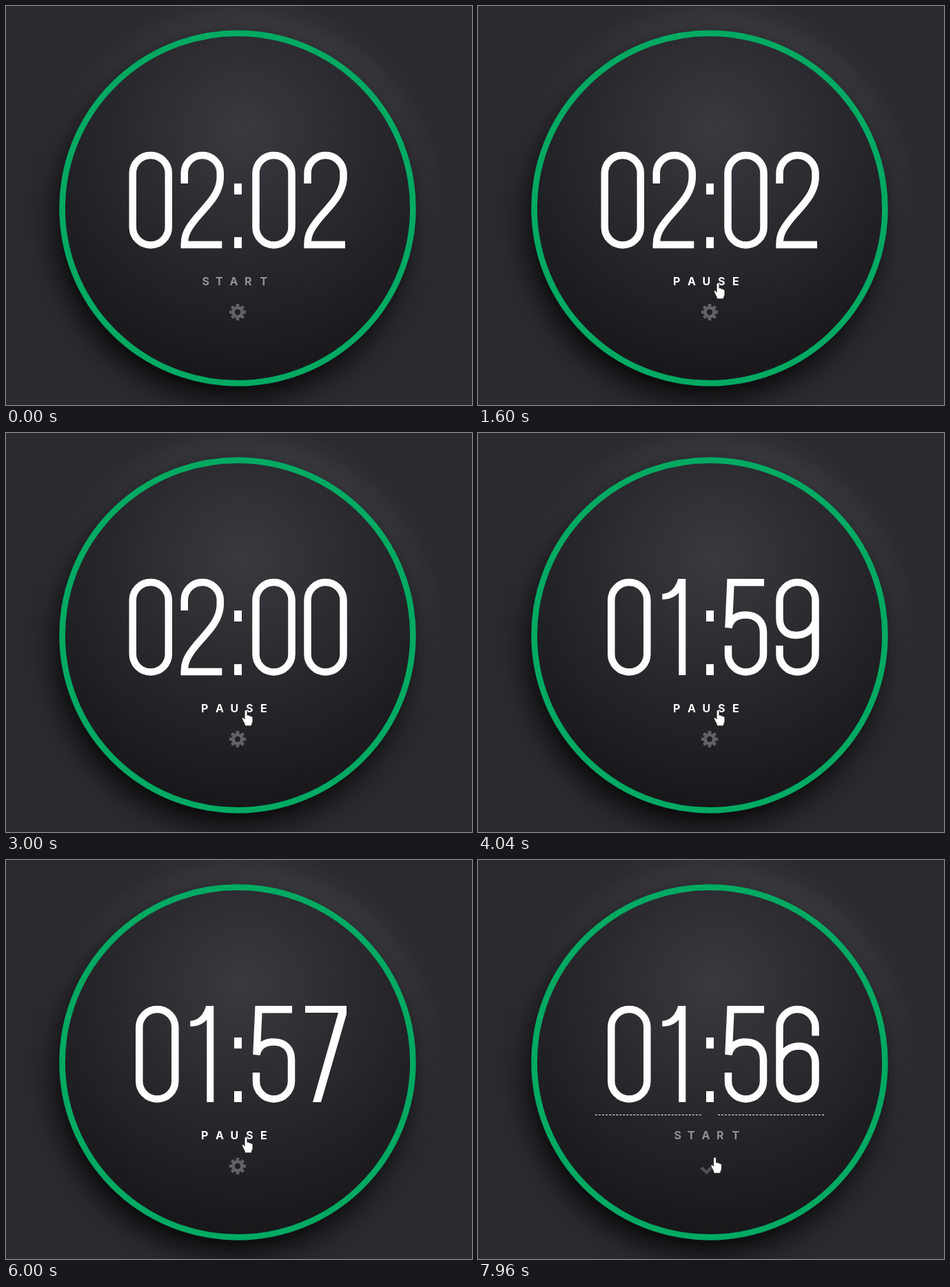
An HTML page that plays this animation: 676x580 px, repeating every 8 s.

```html
<!DOCTYPE html>
<html lang="en">
<head>
<meta charset="utf-8">
<title>Countdown timer</title>
<style>
  html, body { margin: 0; width: 100%; height: 100%; overflow: hidden; background: #2b2a30; }
  #face {
    position: absolute; left: 77px; top: 35px; width: 518px; height: 518px; border-radius: 50%;
    background: radial-gradient(71.4% 71.4% at 51.7% 28.4%, #3a393f 0%, #17171a 100%);
    box-shadow: -5px 14px 44px #000, 5px -16px 50px rgba(255, 255, 255, .15);
  }
  .rule { position: absolute; top: 370px; width: 154px; border-top: 1px dashed #fff; }
  svg { position: absolute; left: 0; top: 0; }
  text { font: 700 16px Inter, "Open Sans", sans-serif; fill: #fff; }
  .line { fill: none; stroke: #fff; stroke-width: 10.5; }
  .solid { fill: #fff; }
  .cursor { fill: #fff; stroke: #111; stroke-width: .8; }
</style>
</head>
<body>
<div id="face"></div>
<div id="rules">
  <div class="rule" style="left:170px"></div>
  <div class="rule" style="left:348px"></div>
</div>
<svg width="676" height="580" viewBox="0 0 676 580">
  <defs>
    <rect id="d0" class="line" x="5.5" y="5" width="52" height="130.5" rx="26"/>
    <path id="d1" class="solid" d="M23 0H34V140H24V20C19 26 11 30 0 30V22C12 21 19 13 23 0Z"/>
    <path id="d2" class="line" d="M5.5 46V31A26 26 0 0 1 57.5 31V37C57.5 62 36 80 23 96S5.5 120 5.5 135H60"/>
    <path id="d5" class="line" d="M58 5.2H9.5L6.5 71C9 58 19 52.5 31 52.5C47 52.5 57 62 57 78V109.5A25.5 26 0 0 1 6 109.5V97"/>
    <path id="d9" class="line" d="M57.5 62V31A26 26 0 0 0 5.5 31V57C5.5 73 15 82 29 82C43 82 53 74 57.5 62V109.5A26 26 0 0 1 5.5 109.5V97"/>
    <use id="d6" href="#d9" transform="rotate(180 31.5 70.2)"/>
    <path id="d7" class="solid" d="M2 0H62V12L25 140H13L50 10H2Z"/>
    <g id="d8">
      <rect class="line" x="7" y="5" width="49" height="60" rx="24.5"/>
      <rect class="line" x="5.5" y="65" width="52" height="70.5" rx="26"/>
    </g>
  </defs>

  <circle cx="336" cy="294" r="254.4" fill="none" stroke="#00aa62" stroke-width="8.6"/>
  <g id="digits"></g>
  <path class="solid" d="M331 258h11v16h-11zM331 336h11v16h-11z"/>
  <text id="label" y="406"></text>
  <g id="gear" transform="translate(336 445)" fill="none" stroke="#626164">
    <circle r="6.5" stroke-width="4.6"/>
  </g>
  <path id="tick" d="M324 447L331.5 454.2L346 439.7" fill="none" stroke="#505053" stroke-width="4.5"/>

  <g id="ring" fill="none">
    <circle r="10.8" stroke="#000"/>
    <circle r="9.8" stroke="#fff"/>
  </g>
  <path id="arrow" class="cursor" d="M0 0V16L3.7 12.5 6.4 18.5 8.8 17.4 6.2 11.6H11.5Z"/>
  <path id="hand" class="cursor" d="M-1.9 1.5C-1.9-1 2-1 2 1.5V7.3C3-.1+6.9 4.8 7 5 8.4C5.7 7.6 7.3 7.9 7.6 9.2C8.7 8.7 10 9.5 10 11V15.5C10 18.5 8.2 20 8 22.8H-1.2C-1.5 19-4.2 16.5-5.4 12.6C-6 10.6-4 9.8-2.8 11.4L-1.9 12.8Z"/>
</svg>
<script>
const LOOP = 8000;
const $ = id => document.getElementById(id);

// Each row: start time, then the values held from there on.
const clock = [[0, "0202"], [2000, "0201"], [3000, "0200"], [4040, "0159"],
               [5000, "0158"], [6000, "0157"], [7000, "0156"]];
const labels = [[0, "START", .5], [840, "START", .75], [920, "START", 1], [1600, "PAUSE", 1],
                [7400, "START", 1], [7560, "START", .7], [7640, "START", .5]];
const pointer = [
  [0, ""],
  [200, "arrow", 585, 555], [280, "arrow", 578, 545], [360, "arrow", 567, 529],
  [440, "arrow", 556, 514], [520, "arrow", 547, 504], [600, "arrow", 543, 499],
  [760, "arrow", 478, 462], [840, "hand", 374, 414], [920, "hand", 350, 404.5],
  [1000, "hand", 349, 404], [1080, "hand", 348, 403],
  [7480, "hand", 347, 411], [7560, "hand", 345, 424], [7640, "hand", 343.5, 432.5]
];
const clicks = [[0, false], [1440, true, 347, 402], [1600, false], [7320, true, 347, 402],
                [7400, false], [7880, true, 343, 432], [7960, false]];
const editAt = 7960;
const letterX = { START: "284.5 304 324.5 346 368.5", PAUSE: "283 304 325.5 348 369" };

const at = (rows, t) => rows.findLast(row => row[0] <= t).slice(1);
const place = (el, x, y) => el.setAttribute("transform", `translate(${x} ${y})`);
const show = (el, on) => { el.style.display = on ? "" : "none"; };

for (let i = 0; i < 8; i++) {
  $("gear").insertAdjacentHTML("beforeend",
    `<path d="M0-8V-12" stroke-width="4.6" transform="rotate(${i * 45})"/>`);
}
$("hand").setAttribute("d",
  "M-1.9 1.5C-1.9-1 2-1 2 1.5V7.3C3 6.6 4.7 7 5 8.4C5.8 7.6 7.3 7.9 7.6 9.2" +
  "C8.7 8.7 10 9.5 10 11V15.5C10 18.5 8.2 20 8 22.8H-1.2" +
  "C-1.5 19-4.2 16.5-5.4 12.6C-6 10.6-4 9.8-2.8 11.4L-1.9 12.8Z");

// A pair with a narrow 1 is shifted to stay centred.
function pair(text, x) {
  const narrow = text[1] === "1";
  const first = x + (narrow ? 9.5 : 0);
  const second = x + (narrow ? 89 : 75);
  return `<use href="#d${text[0]}" x="${first}" y="212"/><use href="#d${text[1]}" x="${second}" y="212"/>`;
}

let shown = "";
function draw(t) {
  const [time] = at(clock, t);
  if (time !== shown) {
    $("digits").innerHTML = pair(time.slice(0, 2), 178.3) + pair(time.slice(2), 357);
    shown = time;
  }

  const [word, alpha] = at(labels, t);
  const label = $("label");
  if (label.textContent !== word) {
    label.textContent = word;
    label.setAttribute("x", letterX[word]);
  }
  label.style.opacity = alpha;

  const [kind, x, y] = at(pointer, t);
  for (const id of ["arrow", "hand"]) {
    show($(id), id === kind);
    if (id === kind) place($(id), x, y);
  }

  const [down, cx, cy] = at(clicks, t);
  show($("ring"), down);
  if (down) place($("ring"), cx, cy);

  const editing = t >= editAt;
  show($("rules"), editing);
  show($("tick"), editing);
  show($("gear"), !editing);
}

const start = performance.now();
function frame() {
  draw((performance.now() - start) % LOOP);
  requestAnimationFrame(frame);
}
frame();
</script>
</body>
</html>
```
